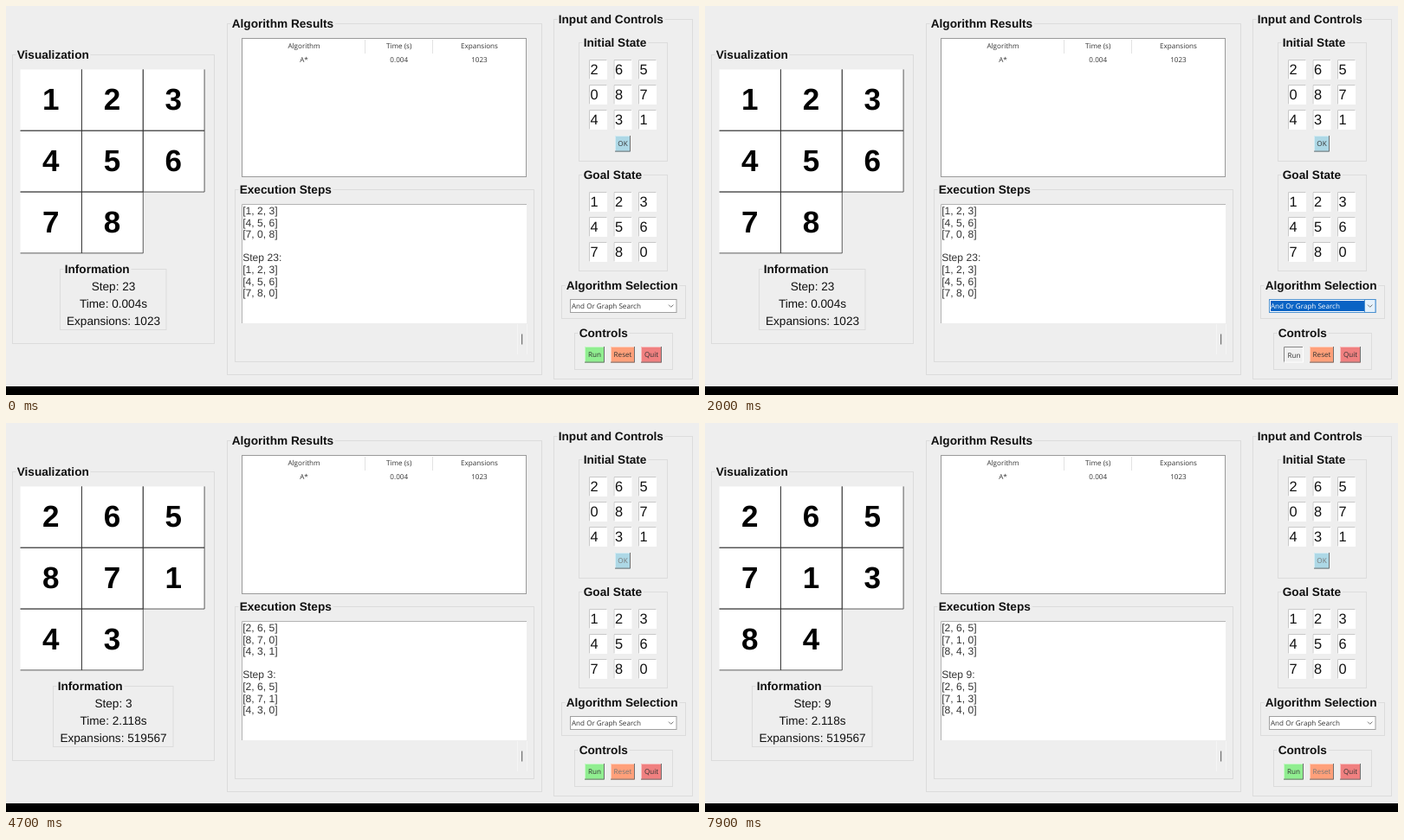
Write an HTML page that moves like this. It is 800x450 px and loops after 8000 ms.

```html
<!DOCTYPE html>
<html lang="en">
<head>
<meta charset="utf-8">
<title>Puzzle solver</title>
<style>
  html, body { margin: 0; width: 100%; height: 100%; overflow: hidden; background: #eee; }
  svg { display: block; width: 800px; height: 450px; }
  text {
    font-family: "Liberation Sans", Arial, sans-serif;
    fill: #111; white-space: pre; text-rendering: geometricPrecision;
  }
  .title { font-size: 13.65px; font-weight: bold; }
  .info { font-size: 13.6px; text-anchor: middle; }
  .log { font-size: 12.1px; fill: #333; }
  .entry { font-size: 16.4px; }
  .tile { font-size: 35px; font-weight: bold; text-anchor: middle; fill: #000; }
  .ui { font: 8.1px "Open Sans", "Noto Sans", sans-serif; fill: #333; }
  .mid { text-anchor: middle; }
  .off { fill: #777; }
</style>
</head>
<body>
<svg id="stage" viewBox="0 0 800 450"></svg>
<script>
const LOOP = 8000, PRESS = 1000, SOLVED = 3095, STEP = 505;
const BG = '#eeeeee', EDGE = '#dcdcdc';
const LEFT = 16.6, TOP = 73.4, CELL = 70.83;
const stage = document.getElementById('stage');

function add(parent, tag, attrs, content) {
  const el = document.createElementNS('http://www.w3.org/2000/svg', tag);
  for (const key in attrs) el.setAttribute(key, attrs[key]);
  if (content !== undefined) el.textContent = content;
  parent.appendChild(el);
  return el;
}
const group = () => add(stage, 'g', {});
const rect = (p, x, y, width, height, fill, stroke = 'none') =>
  add(p, 'rect', { x, y, width, height, fill, stroke });
const path = (p, d, stroke, width = 1) =>
  add(p, 'path', { d, stroke, fill: 'none', 'stroke-width': width });
const text = (p, cls, x, y, s) => add(p, 'text', { class: cls, x, y }, s);

// Label frame whose title interrupts the top edge
function frame(p, x, y, right, bottom, title) {
  rect(p, x, y, right - x, bottom - y, 'none', EDGE);
  const label = text(p, 'title', x + 5.2, y + 4.6, title);
  const gap = rect(p, x + 4, y - 2, label.getComputedTextLength() + 3, 4, BG);
  p.insertBefore(gap, label);
}

function entries(top, digits) {
  [...digits].forEach((d, i) => {
    const x = 673 + (i % 3) * 28.5, y = top + Math.floor(i / 3) * 29;
    rect(stage, x, y, 21, 23, '#fff');
    path(stage, `M${x + .5} ${y + 22.5}V${y + .5}H${x + 20.5}`, '#c8c8c8');
    text(stage, 'entry', x + 1.6, y + 17, d);
  });
}

function button(p, x, y, w, label, fill, { off = false, sunk = false } = {}) {
  const h = 18.6, shift = sunk ? .6 : 0;
  rect(p, x, y, w, h, fill);
  path(p, `M${x + .5} ${y + h}V${y + .5}H${x + w}`, sunk ? '#888' : '#ffffff80');
  path(p, `M${x} ${y + h - .5}H${x + w - .5}V${y}`, sunk ? '#fff' : '#707070');
  text(p, off ? 'ui mid off' : 'ui mid', x + w / 2 + shift, y + 12.1 + shift, label);
}

function drawStatic() {
  rect(stage, 0, 0, 800, 450, BG);
  rect(stage, 0, 440, 800, 10, '#000');
  [
    [7.5, 56.5, 240.5, 390.5, 'Visualization'],
    [255.5, 20.5, 618.5, 426.5, 'Algorithm Results'],
    [264.5, 212.5, 609.5, 411.5, 'Execution Steps'],
    [632.5, 15.5, 792.5, 431.5, 'Input and Controls'],
    [661.5, 42.5, 763.5, 179.5, 'Initial State'],
    [661.5, 195.5, 763.5, 306.5, 'Goal State'],
    [641.5, 323.5, 784.5, 361.5, 'Algorithm Selection'],
    [656.5, 378.5, 769.5, 420.5, 'Controls']
  ].forEach(f => frame(stage, ...f));

  rect(stage, 272.5, 37.5, 328, 160, '#fff', '#9a9a9a');
  path(stage, 'M414.5 39V55M492.5 39V55', '#e2e2e2');
  [[344, 'Algorithm', 'A*'], [453.7, 'Time (s)', '0.004'], [546.5, 'Expansions', '1023']]
    .forEach(([x, head, value]) => {
      text(stage, 'ui mid', x, 49, head);
      text(stage, 'ui mid', x, 64.7, value);
    });

  rect(stage, 272, 229, 329, 138, '#fff');
  path(stage, 'M272.5 367V229.5H601', '#b4b4b4');
  path(stage, 'M590.5 368V403M601.5 368V403', '#f5f5f5');
  path(stage, 'M595.7 379.5V391.5', '#555');

  entries(62, '265087431');
  entries(215, '123456780');
  button(stage, 733, 394, 24, 'Quit', '#f08080');
}

drawStatic();
const board = group(), info = group(), log = group(), controls = group();

// Slide the blank along its route to obtain every board
const boards = [[...'265087431']];
[4, 5, 8, 7, 6, 3, 4, 5, 8].forEach(to => {
  const next = [...boards[boards.length - 1]];
  next[next.indexOf('0')] = next[to];
  next[to] = '0';
  boards.push(next);
});
const solved = { cells: [...'123456780'], prev: [...'123456708'], step: 23 };

const rows = cells => [0, 3, 6].map(i => `[${cells.slice(i, i + 3).join(', ')}]`);

function drawBoard(cells) {
  board.replaceChildren();
  const tiles = cells
    .map((d, i) => [d, LEFT + (i % 3) * CELL, TOP + Math.floor(i / 3) * CELL])
    .filter(([d]) => d !== '0');
  tiles.forEach(([, x, y]) => rect(board, x, y, CELL, CELL, '#fff'));
  tiles.forEach(([d, x, y]) => {
    const left = x > LEFT ? `M${x} ${y}v${CELL}` : '';
    const top = y > TOP ? `M${x} ${y}h${CELL}` : '';
    path(board, `${left}${top}M${x + CELL} ${y}v${CELL}h${-CELL}`, '#333', .8);
    text(board, 'tile', x + CELL / 2 - .4, y + 46.5, d);
  });
}

function drawInfo(step, time, count, half) {
  info.replaceChildren();
  frame(info, 124 - half, 304.5, 124 + half - .5, 374.5, 'Information');
  [`Step: ${step}`, `Time: ${time}s`, `Expansions: ${count}`]
    .forEach((s, i) => text(info, 'info', 124, 328.8 + i * 20, s));
}

function drawLog(step, cells, prev) {
  log.replaceChildren();
  const head = prev ? [...rows(prev), ''] : [];
  [...head, `Step ${step}:`, ...rows(cells)]
    .forEach((s, i) => text(log, 'log', 273.2, 241.4 + i * 13.52, s));
}

function drawControls(busy, playing) {
  controls.replaceChildren();
  button(controls, 703, 150, 18, 'OK', '#add8e6', { off: playing });
  button(controls, 668, 394, 23, 'Run', busy ? '#f0f0f0' : '#90ee90', { sunk: busy });
  button(controls, 698, 394, 28, 'Reset', '#ffa07a', { off: playing });

  rect(controls, 651.5, 339.5, 122.5, 15, '#fff', busy ? '#4a90d0' : '#a0a0a0');
  if (busy) {
    rect(controls, 653, 341, 108, 12, '#0a63c4');
    rect(controls, 761.5, 339.5, 12.5, 15, '#e5f1fb', '#4a90d0');
  }
  const name = text(controls, 'ui', 653, 350, 'And Or Graph Search');
  if (busy) name.style.fill = '#fff';
  path(controls, 'M765 345.6L767.7 348.3L770.4 345.6', '#666', .9);
}

let shown;
function render(now) {
  const t = now % LOOP;
  const step = t < SOLVED ? -1 : Math.min(9, Math.floor((t - SOLVED) / STEP));
  const busy = t >= PRESS && t < SOLVED;
  const key = `${step} ${busy}`;
  if (key !== shown) {
    shown = key;
    const playing = step >= 0;
    const state = playing ? { cells: boards[step], prev: boards[step - 1], step } : solved;
    drawBoard(state.cells);
    drawLog(state.step, state.cells, state.prev);
    if (playing) drawInfo(step, '2.118', 519567, 69.5);
    else drawInfo(23, '0.004', 1023, 61.5);
    drawControls(busy, playing);
  }
  requestAnimationFrame(render);
}
render(performance.now());
</script>
</body>
</html>
```
